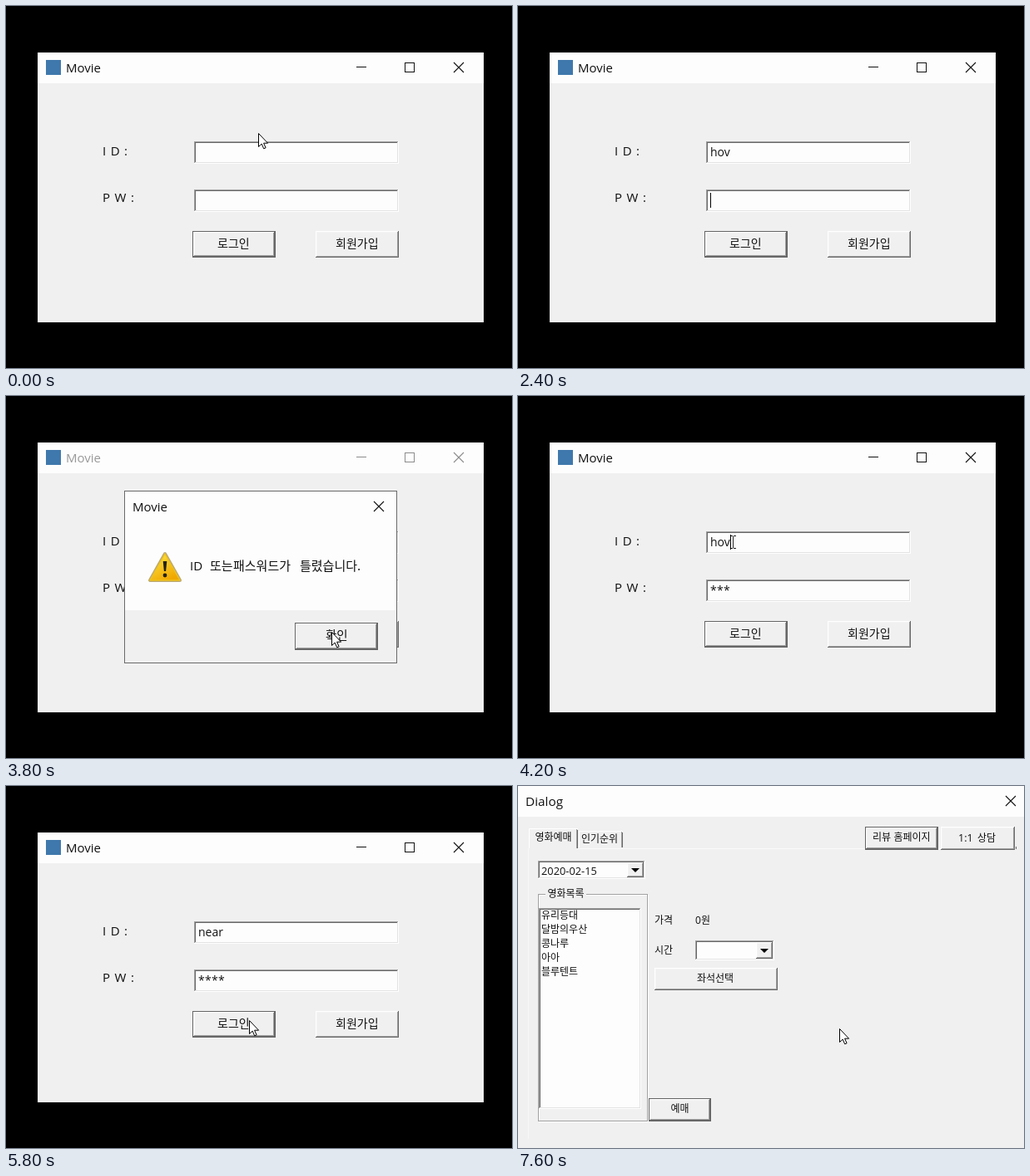
Write an HTML page that moves like this. It is 608 px wide and 436 px high and loops after 8 s.

```html
<!DOCTYPE html>
<html lang="ko">
<head>
<meta charset="utf-8">
<title>Movie login</title>
<style>
  html, body { margin: 0; width: 100%; height: 100%; overflow: hidden; background: #000; }
  svg { display: block; position: absolute; left: 0; top: 0; }
  text { font-family: "Open Sans", "Noto Sans CJK KR", "Noto Sans CJK", sans-serif; fill: #111; white-space: pre; }
  .ko { font-family: "Noto Sans CJK KR", "Noto Sans CJK", sans-serif; }
  .label { letter-spacing: .8px; }
  .star { letter-spacing: .3px; }
  .crisp { shape-rendering: crispEdges; }
  .glyph { fill: none; stroke: #111; stroke-width: 1.1; }
  .inactive .glyph { stroke: #8c8c8c; }
  .inactive .caption { fill: #999; }
  .selected { fill: #fff; }
  .hidden { display: none; }
</style>
</head>
<body>
<svg id="stage" width="608" height="436" viewBox="0 0 608 436"></svg>
<script>
const FACE = '#f0f0f0', PAPER = '#fdfdfd', DARK = '#696969', MID = '#a0a0a0';

const rect = (x, y, w, h, fill, more = '') =>
  `<rect class="crisp" x="${x}" y="${y}" width="${w}" height="${h}" fill="${fill}" ${more}/>`;
const text = (x, y, size, str, cls = '') =>
  `<text x="${x}" y="${y}" font-size="${size}" class="${cls}">${str}</text>`;
const group = (id, body, cls = '') => `<g id="${id}" class="${cls}">${body}</g>`;
const closeMark = (x, y) => `<path class="glyph" d="M${x} ${y}l12 12m0-12l-12 12"/>`;

// One-pixel frame: top/left colour, then bottom/right colour
const edge = (x, y, w, h, light, dark) =>
  rect(x, y, w, 1, light) + rect(x, y, 1, h, light) +
  rect(x, y + h - 1, w, 1, dark) + rect(x + w - 1, y, 1, h, dark);

const raised = (x, y, w, h) => rect(x, y, w, h, FACE) +
  edge(x, y, w, h, '#fff', DARK) + edge(x + 1, y + 1, w - 2, h - 2, '#f4f4f4', MID);
const defaultButton = (x, y, w, h) =>
  rect(x, y, w, h, '#646464') + raised(x + 1, y + 1, w - 2, h - 2);
const sunken = (x, y, w, h) => rect(x, y, w, h, PAPER) +
  edge(x, y, w, h, MID, '#fff') + edge(x + 1, y + 1, w - 2, h - 2, DARK, '#e3e3e3');

const combo = (x, y, w, h) => sunken(x, y, w, h) + raised(x + w - 22, y + 2, 20, h - 4) +
  `<path d="M${x + w - 17} ${y + h / 2 - 2}h10l-5 5z" fill="#000"/>`;

const field = (name, y, cls) => sunken(226, y, 246, 27) + group(name,
  rect(231, y + 4, 0, 18, '#0078d7') + text(231, y + 18, 14, '', cls) +
  rect(231, y + 4, 1, 18, '#000'));

const login = rect(0, 0, 608, 436, '#000') +
  rect(38, 56, 536, 325, FACE) + rect(38, 56, 536, 37, PAPER) +
  rect(48, 65, 18, 18, '#3f78ac') +
  text(72, 80, 15, 'Movie', 'caption') +
  '<path class="glyph crisp" d="M421 73.5h12M479.5 68.5h11v11h-11z"/>' + closeMark(538, 68) +
  text(116, 180, 15, 'I D :', 'label') + text(116, 236, 15, 'P W :', 'label') +
  field('id', 163, '') + field('pw', 221, 'star') +
  defaultButton(224, 271, 100, 32) + text(254, 291, 14, '로그인', 'ko') +
  raised(372, 271, 100, 32) + text(396, 291, 14, '회원가입', 'ko');

const alertBox = rect(142, 114, 328, 208, '#6a6a6a') +
  rect(143, 115, 326, 143, PAPER) + rect(143, 258, 326, 63, FACE) +
  text(152, 139, 15, 'Movie') + closeMark(442, 127) +
  '<path d="M191 190L173 222H209Z" fill="url(#amber)" stroke="#b9a878" stroke-width="4" stroke-linejoin="round"/>' +
  '<path d="M191 190L173 222H209Z" fill="url(#amber)" stroke="#efc21c" stroke-width="1.5" stroke-linejoin="round"/>' +
  '<path d="M188.7 199h4.6l-1.2 12h-2.2z" fill="#222"/><circle cx="191" cy="216" r="2.4" fill="#222"/>' +
  text(221, 210, 15, 'ID') + text(245, 210, 15, '또는', 'ko') +
  text(273, 210, 15, '패스워드가', 'ko') + text(353, 210, 15, '틀렸습니다.', 'ko') +
  defaultButton(347, 273, 100, 33) + text(384, 294, 14.5, '확인', 'ko');

const films = ['유리등대', '달밤의우산', '콩나루', '아아', '블루텐트'];

const etched = (x, y, w, h) =>
  `<path class="crisp" fill="none" stroke="#fff" d="M${x + 1.5} ${y + 1.5}h${w}v${h}h${-w}z"/>` +
  `<path class="crisp" fill="none" stroke="${MID}" d="M${x + .5} ${y + .5}h${w}v${h}h${-w}z"/>`;

const tab = (x, y, w, h) => rect(x, y, w, 1, '#fff') + rect(x, y, 1, h, '#fff') +
  rect(x + w - 2, y + 1, 1, h - 1, MID) + rect(x + w - 1, y + 2, 1, h - 2, DARK);

const booking = rect(0, 0, 608, 436, FACE) + rect(0, 0, 608, 37, PAPER) +
  text(9, 24, 15.3, 'Dialog') + closeMark(586, 12) +
  rect(72, 75, 526, 1, '#fafafa') + rect(12, 75, 1, 350, '#f7f7f7') + rect(598, 73, 1, 3, DARK) +
  tab(13, 51, 59, 24) + tab(73, 54, 53, 20) +
  text(20.5, 66, 12, '영화예매', 'ko') + text(76, 68, 12, '인기순위', 'ko') +
  defaultButton(417, 49, 88, 28) + text(426, 66, 12, '리뷰 홈페이지', 'ko') +
  raised(508, 49, 89, 28) + text(529, 67, 12.5, '1:1') + text(552, 67, 12, '상담', 'ko') +
  combo(24, 90, 129, 22) + text(28, 107, 12.8, '2020-02-15') +
  etched(24, 130, 131, 273) + rect(33, 128, 49, 5, FACE) + text(35.5, 134, 12, '영화목록', 'ko') +
  sunken(25, 147, 123, 242) +
  films.map((name, i) => text(28, 160 + 17 * i, 12, name, 'ko')).join('') +
  text(164, 166, 12, '가격', 'ko') + text(213, 166, 12, '0') + text(220, 166, 12, '원', 'ko') +
  text(164, 202, 12, '시간', 'ko') + combo(213, 186, 95, 24) +
  raised(164, 219, 148, 27) + text(215, 236, 12, '좌석선택', 'ko') +
  defaultButton(157, 376, 75, 28) + text(183.5, 393, 12, '예매', 'ko');

const arrow = '<path d="M.5.5v16l3.7-3.4 2.5 5.7 2.4-1-2.5-5.6h5z" fill="#fff" stroke="#000"/>';
const beam = '<path class="crisp" d="M-2.5.5h2l1 1 1-1h2M.5 1v14M-2.5 15.5h2l1-1 1 1h2" fill="none" stroke="#222"/>';

const stage = document.getElementById('stage');
stage.innerHTML =
  '<defs><linearGradient id="amber" x2=".6" y2="1"><stop stop-color="#ffe94a"/><stop offset="1" stop-color="#f0a800"/></linearGradient></defs>' +
  group('login', login) + group('alert', alertBox) + group('booking', booking) +
  group('arrow', arrow) + group('beam', beam);

// Each step changes only the named parts of the state
const steps = [
  [0, { id: '', pw: '', focus: '', sel: '', alert: false, booking: false, arrow: [303, 153], beam: null }],
  [200, { arrow: [336, 115] }],
  [400, { arrow: [355, 94] }],
  [600, { arrow: [312, 134] }],
  [800, { arrow: null, beam: [272, 168] }],
  [1000, { beam: [241, 168], focus: 'id' }],
  [1200, { beam: null }],
  [1600, { id: 'h' }],
  [1800, { id: 'ho' }],
  [2000, { id: 'hov' }],
  [2400, { focus: 'pw' }],
  [2600, { pw: '**' }],
  [2800, { pw: '***' }],
  [3000, { arrow: [300, 280] }],
  [3200, { alert: true, focus: '', arrow: [311, 274] }],
  [3600, { arrow: [352, 281] }],
  [3800, { arrow: [391, 284] }],
  [4000, { alert: false }],
  [4200, { arrow: null, beam: [258, 168], focus: 'id' }],
  [4400, { beam: [232, 168], sel: 'id' }],
  [4600, { id: 'ne', sel: '', beam: null }],
  [4800, { id: 'nea' }],
  [5000, { id: 'near' }],
  [5200, { focus: 'pw', sel: 'pw' }],
  [5400, { pw: '**', sel: '' }],
  [5600, { pw: '****' }],
  [5800, { focus: '', arrow: [292, 282] }],
  [6000, { booking: true, arrow: [294, 283] }],
  [6700, { arrow: [324, 284] }],
  [7400, { arrow: [352, 287] }],
  [7600, { arrow: [386, 292] }]
];
let last = {};
const states = steps.map(([, change]) => last = { ...last, ...change });

const part = id => document.getElementById(id);
const show = (id, on) => part(id).classList.toggle('hidden', !on);

function place(id, at) {
  show(id, at);
  if (at) part(id).setAttribute('transform', `translate(${at})`);
}

function fill(name, s) {
  const [mark, label, caret] = part(name).children;
  const selected = s.sel === name;
  label.textContent = s[name];
  label.classList.toggle('selected', selected);
  const width = s[name] ? label.getComputedTextLength() : 0;
  mark.setAttribute('width', selected ? width : 0);
  caret.setAttribute('x', Math.round(231 + width));
  caret.classList.toggle('hidden', s.focus !== name || selected);
}

function render(s) {
  show('login', !s.booking);
  show('booking', s.booking);
  show('alert', s.alert);
  part('login').classList.toggle('inactive', s.alert);
  if (!s.booking) ['id', 'pw'].forEach(name => fill(name, s));
  place('arrow', s.arrow);
  place('beam', s.beam);
}

const start = performance.now();
let shown = -1;
function tick() {
  const t = (performance.now() - start) % 8000;
  const now = steps.findLastIndex(([at]) => at <= t);
  if (now !== shown) render(states[shown = now]);
  requestAnimationFrame(tick);
}
tick();
</script>
</body>
</html>
```
